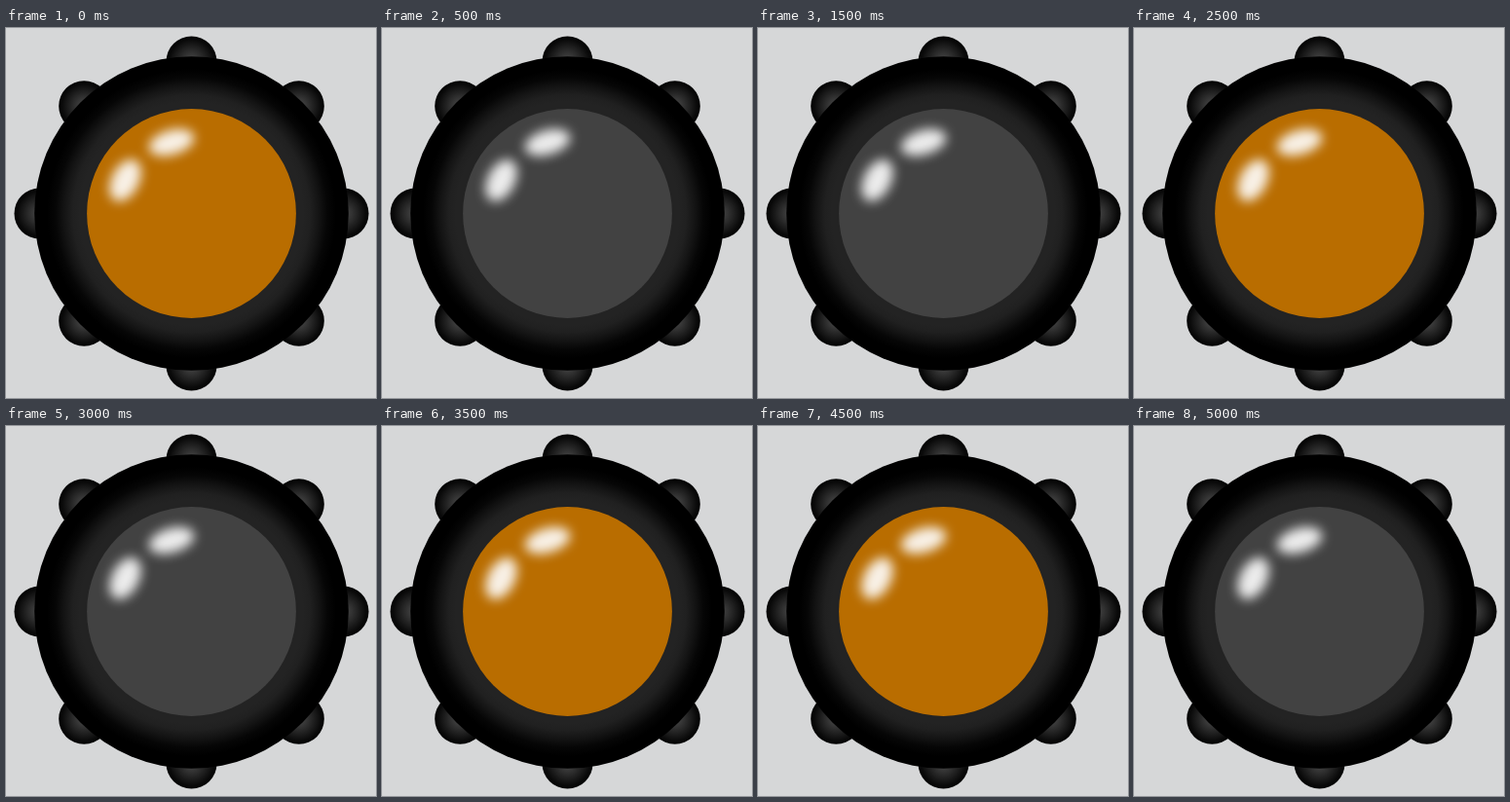
Write an HTML page that moves like this. It is 380 px wide and 380 px high and loops after 10000 ms.

```html
<!DOCTYPE html>
<html lang="en">
<head>
<meta charset="utf-8">
<title>Blinking lamp</title>
<style>
  html, body { margin: 0; width: 100%; height: 100%; overflow: hidden; background: #d6d7d8; }
  svg { display: block; width: 100%; height: 100%; }
  .lens { fill: #b96d00; animation: blink 10s step-end infinite; }
  /* three quick flashes, then three slow ones, then a long pause */
  @keyframes blink {
    0%, 7.5%, 12.5%, 25%, 35%, 45% { fill: #b96d00; }
    5%, 10%, 15%, 30%, 40%, 50%, 100% { fill: #424242; }
  }
</style>
</head>
<body>
<svg viewBox="0 0 380 380">
  <defs>
    <radialGradient id="knobShade">
      <stop offset="0" stop-color="#4c4c4c"/>
      <stop offset="1" stop-color="#000"/>
    </radialGradient>
    <radialGradient id="ringShade">
      <stop offset=".71" stop-color="#232323"/>
      <stop offset=".755" stop-color="#202020"/>
      <stop offset=".81" stop-color="#141414"/>
      <stop offset=".865" stop-color="#060606"/>
      <stop offset=".92" stop-color="#000"/>
    </radialGradient>
    <filter id="soft" x="-100%" y="-100%" width="300%" height="300%" color-interpolation-filters="sRGB">
      <feGaussianBlur stdDeviation="5.6"/>
    </filter>
    <circle id="knob" cy="-156" r="26" fill="url(#knobShade)"/>
  </defs>
  <g transform="translate(190.5 190.5)">
    <use href="#knob"/>
    <use href="#knob" transform="rotate(45)"/>
    <use href="#knob" transform="rotate(90)"/>
    <use href="#knob" transform="rotate(135)"/>
    <use href="#knob" transform="rotate(180)"/>
    <use href="#knob" transform="rotate(225)"/>
    <use href="#knob" transform="rotate(270)"/>
    <use href="#knob" transform="rotate(315)"/>
    <circle r="161.3" fill="url(#ringShade)"/>
    <circle class="lens" r="107.4"/>
  </g>
  <g fill="#fff" fill-opacity=".9" filter="url(#soft)">
    <ellipse rx="24" ry="12.5" transform="translate(170 117.5) rotate(-16)"/>
    <ellipse rx="23" ry="14" transform="translate(122.5 156.5) rotate(-63)"/>
  </g>
</svg>
</body>
</html>
```
